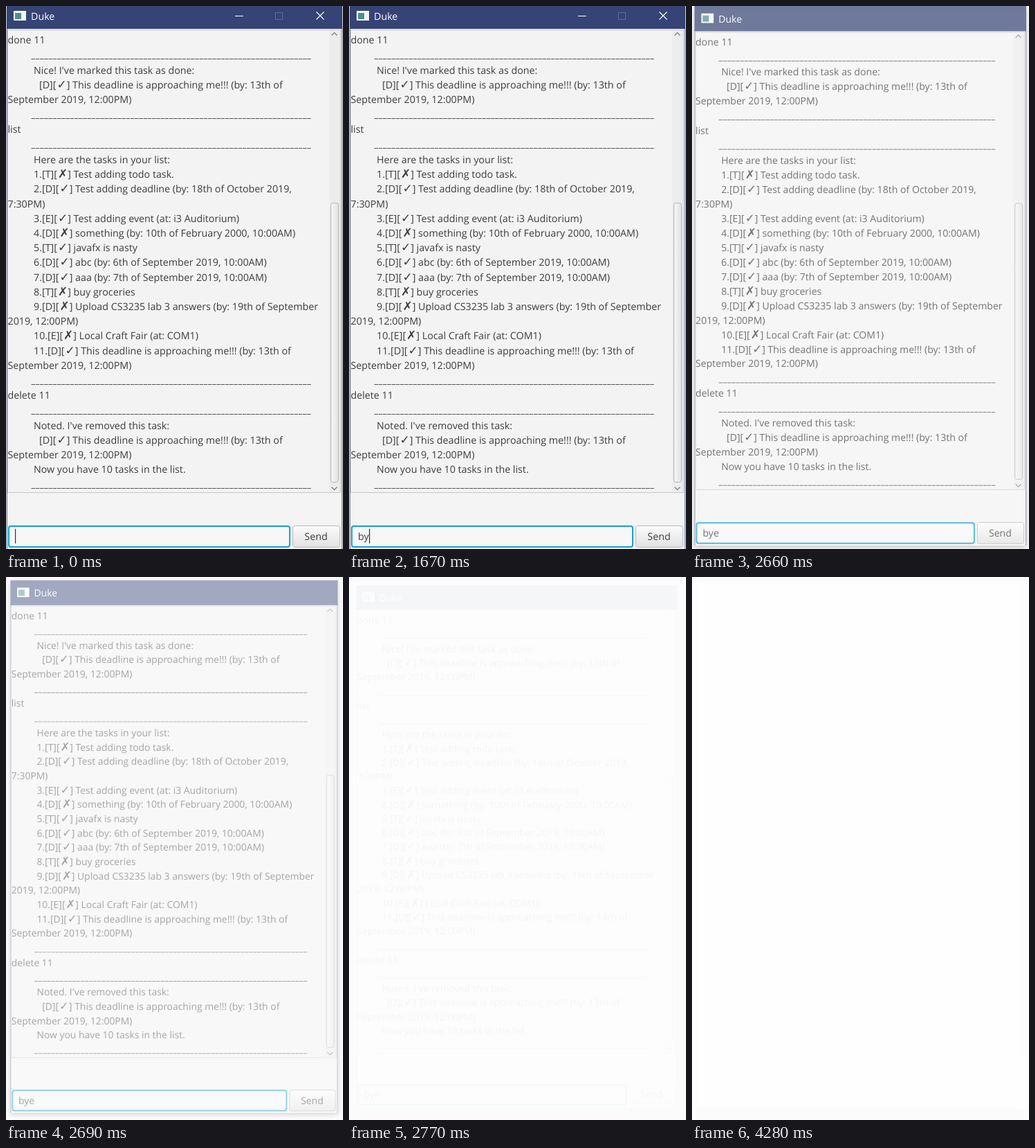
Animation, 487 px wide and 784 px high, one loop 4810 ms. Source, as an HTML page:

```html
<!DOCTYPE html>
<html lang="en">
<head>
<meta charset="utf-8">
<title>Duke</title>
<style>
  html, body { margin: 0; width: 100%; height: 100%; overflow: hidden; background: #fbfbfb; }
  svg { display: block; width: 487px; height: 784px; }
  text { font: 14.25px "Open Sans", "Noto Sans", sans-serif; fill: #3c3c3c; white-space: pre; text-rendering: geometricPrecision; }
  .mark { font: 17px "DejaVu Sans", sans-serif; }
  .bar { fill: #354475; }
  .title { fill: #fff; }
  .rule { stroke: #555; stroke-width: 1.1; stroke-dasharray: 5.5 .73; }
  .frame { fill: #f4f4f4; filter: drop-shadow(0 2px 4px rgba(0, 0, 0, .35)); }
  .line { fill: none; stroke: #fff; stroke-width: 1.1; }
</style>
</head>
<body>
<svg viewBox="0 0 487 784">
  <defs>
    <linearGradient id="btn" x2="0" y2="1">
      <stop offset="0" stop-color="#fbfbfb"/>
      <stop offset="1" stop-color="#e2e2e2"/>
    </linearGradient>
    <linearGradient id="thumb">
      <stop offset="0" stop-color="#f6f6f6"/>
      <stop offset="1" stop-color="#e2e2e2"/>
    </linearGradient>
  </defs>

  <rect width="487" height="784" fill="#fbfbfb"/>
  <rect x="6" y="6" width="476" height="764" rx="3" fill="#fcfcfc"/>
  <rect x="8" y="10" width="466" height="756" rx="2" fill="#fefefe"/>
  <rect id="corner" x="470" y="690" width="12" height="78" rx="4" fill="#fefefe"/>

  <g id="win">
    <rect class="frame" x="1" y="-4" width="485" height="788.5"/>
    <path d="M1.5 30V784.5M485.5 30V784.5" stroke="#6f7a9f"/>
    <rect class="bar" x="1" y="-4" width="485" height="37"/>
    <rect x="11" y="7" width="18" height="14" fill="#f4f6f6"/>
    <rect x="13" y="10" width="9" height="9" fill="#4f8f8c"/>
    <text class="title" x="36" y="20">Duke</text>
    <g id="controls" class="line">
      <path d="M331 14.5h12M448.500 8.500l11 11M459.500 8.500l-11 11"/>
      <rect x="389.500" y="9.500" width="10" height="10" stroke="#5b6892"/>
    </g>

    <rect x="2.500" y="34.500" width="481" height="668" fill="#f3f3f3" stroke="#c6c6c6"/>
    <rect x="467" y="35" width="16" height="667" fill="#ececec"/>
    <rect x="469.500" y="284.500" width="11" height="403" rx="3" fill="url(#thumb)" stroke="#b4b4b4"/>
    <path class="line" style="stroke:#777" d="M470.500 42.500l4-4 4 4M470.500 694.500l4 4 4-4"/>
    <g id="log"></g>

    <rect x="4" y="751" width="406" height="30" rx="3" fill="#f7f7f7" stroke="#149fd3" stroke-width="2"/>
    <text id="input" x="13" y="771"></text>
    <rect id="caret" y="755" width="1.200" height="21" fill="#333"/>
    <rect x="414.500" y="750.500" width="68" height="31" rx="3" fill="url(#btn)" stroke="#b8b8b8"/>
    <text x="448" y="771" text-anchor="middle">Send</text>
  </g>
</svg>
<script>
const $ = id => document.getElementById(id);
const LOOP = 4810;

// "-" is a rule, ">" an indented line, ">>" a nested one
const lines = [
  "done 11",
  "-",
  ">Nice! I've marked this task as done:",
  ">>[D][✓] This deadline is approaching me!!! (by: 13th of",
  "September 2019, 12:00PM)",
  "-",
  "list",
  "-",
  ">Here are the tasks in your list:",
  ">1.[T][✗] Test adding todo task.",
  ">2.[D][✓] Test adding deadline (by: 18th of October 2019,",
  "7:30PM)",
  ">3.[E][✓] Test adding event (at: i3 Auditorium)",
  ">4.[D][✗] something (by: 10th of February 2000, 10:00AM)",
  ">5.[T][✓] javafx is nasty",
  ">6.[D][✓] abc (by: 6th of September 2019, 10:00AM)",
  ">7.[D][✓] aaa (by: 7th of September 2019, 10:00AM)",
  ">8.[T][✗] buy groceries",
  ">9.[D][✗] Upload CS3235 lab 3 answers (by: 19th of September",
  "2019, 12:00PM)",
  ">10.[E][✗] Local Craft Fair (at: COM1)",
  ">11.[D][✓] This deadline is approaching me!!! (by: 13th of",
  "September 2019, 12:00PM)",
  "-",
  "delete 11",
  "-",
  ">Noted. I've removed this task:",
  ">>[D][✓] This deadline is approaching me!!! (by: 13th of",
  "September 2019, 12:00PM)",
  ">Now you have 10 tasks in the list.",
  "-"
];
const indents = [2.5, 40, 48];

function buildLog() {
  let y = 54, out = "";
  for (const line of lines) {
    if (line === "-") {
      const ry = Math.round(y + .7) + .5;
      out += `<path class="rule" d="M36.500 ${ry}H441"/>`;
      y += 22.3;
      continue;
    }
    const depth = line.match(/^>*/)[0].length;
    const body = line.slice(depth).replace(/[✓✗]/, m => `<tspan class="mark" dx="1">${m}</tspan>`);
    out += `<text x="${indents[depth]}" y="${y.toFixed(1)}">${body}</text>`;
    y += 21.2;
  }
  $("log").innerHTML = out;
}

// time, typed text, caret x (0 = hidden)
const typing = [
  [0, "", 13], [140, "", 0], [640, "", 13], [1140, "", 0],
  [1320, "b", 21.5], [1670, "by", 29], [1760, "bye", 36.5], [2260, "bye", 0]
];

// time, scale, x, y, opacity
const closing = [
  [0, 1, 0, 0, 1],
  [2660, .9885, 2.6, 3.8, .71],
  [2690, .9755, 5.4, 8.6, .455],
  [2720, .966, 7.2, 12.2, .24],
  [2750, .959, 8.5, 14.6, .1],
  [2770, .956, 9.2, 15.4, .04],
  [3970, .956, 9.2, 15.4, 0]
];

const at = (steps, t) => steps.findLast(s => s[0] <= t);

function draw(t) {
  const [, typed, caretX] = at(typing, t);
  const [, scale, x, y, alpha] = at(closing, t);
  $("input").textContent = typed;
  $("caret").setAttribute("x", caretX);
  $("caret").style.visibility = caretX ? "visible" : "hidden";
  $("win").setAttribute("transform", `translate(${x} ${y}) scale(${scale})`);
  $("win").style.opacity = alpha;
  $("controls").style.opacity = t < 2660 ? 1 : 0;
  $("corner").style.opacity = t < 4280 ? 0 : 1;
}

buildLog();
const start = performance.now();
function tick() {
  draw((performance.now() - start) % LOOP);
  requestAnimationFrame(tick);
}
tick();
</script>
</body>
</html>
```
